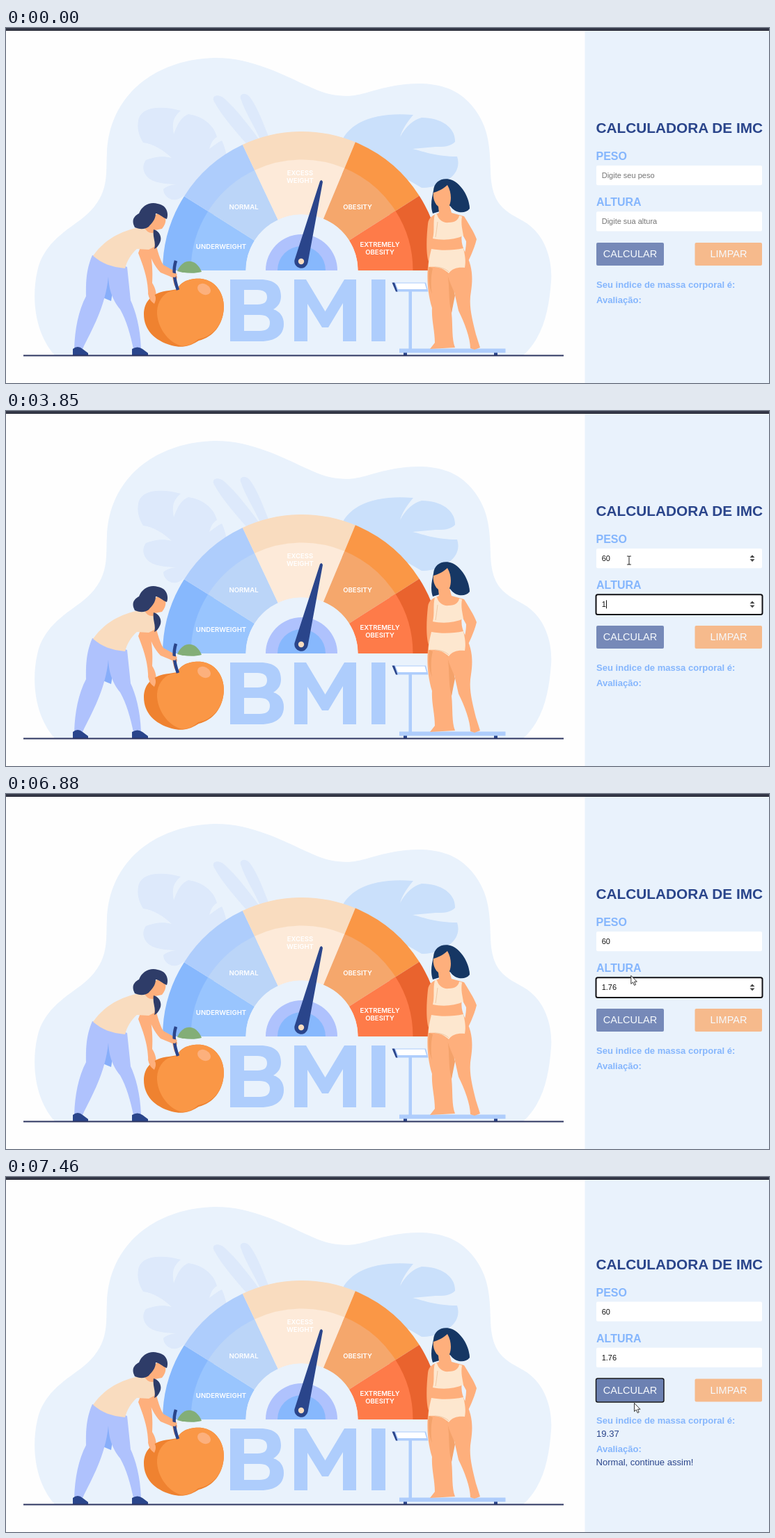
Animation, 1096 px wide and 511 px high, one loop 8000 ms. Source, as an HTML page:

```html
<!DOCTYPE html>
<html lang="pt-BR">
<head>
<meta charset="utf-8">
<title>Calculadora de IMC</title>
<style>
  html, body { margin: 0; width: 100%; height: 100%; overflow: hidden; background: #fefefe; }
  svg { display: block; width: 100vw; height: 100vh; font-family: "Liberation Sans", Arial, sans-serif; }
  .dial { font: 600 9.6px Inter, sans-serif; fill: #fff; text-anchor: middle; }
  .label { font-weight: bold; font-size: 16px; fill: #85b6fd; }
  .result { font-size: 13.05px; fill: #2a458b; }
  .result.head { font-weight: bold; fill: #85b6fd; }
  .value { font-size: 11px; }
  .button { font-size: 14.5px; fill: #fff; text-anchor: middle; }
  .skin { fill: #feaf7c; }
  .navy { fill: #2a458b; }
  .sky { fill: #aecdfc; }
  .panel { fill: #e9f2fc; }
  .focus { fill: none; stroke: #101014; stroke-width: 2; }
</style>
</head>
<body>
<svg viewBox="0 0 1096 511" preserveAspectRatio="none">
  <!-- backdrop -->
  <path class="panel" d="M70 471C42 440 36 390 45 350C54 308 90 290 112 272C150 240 143 210 145 180C148 100 210 46 298 43C352 42 397 67 437 85C475 103 500 99 525 91C575 76 632 72 664 106C694 137 695 170 696 205C697 260 722 265 748 281C778 302 785 340 783 365C780 405 772 445 743 471Z"/>
  <g fill="#dde9fb">
    <path d="M190 134C193 112 225 112 251 119C238 130 239 140 241 153C246 138 252 128 262 124C283 127 299 140 303 157C297 160 294 167 292 174C299 169 305 164 310 162C317 177 319 190 314 205L250 245C238 252 226 242 226 232C232 226 245 224 254 225C238 225 218 225 206 217C196 209 195 198 201 190C214 185 226 184 238 187C226 176 213 167 197 165C191 155 188 145 190 134Z"/>
    <path d="M299 106C294 96 306 95 313 101C333 119 350 142 367 165L350 172C331 150 311 128 299 106Z"/>
    <path d="M338 104C333 95 343 91 350 99C361 114 368 133 377 156L366 162C356 140 344 122 338 104Z"/>
  </g>
  <path fill="#cae0fb" d="M484 159C500 131 538 121 585 125C576 136 569 146 566 157C574 142 585 132 597 129C626 129 646 144 645 164C638 171 628 171 617 171L584 174C601 178 617 185 648 185C652 197 648 209 637 217C626 225 610 231 597 230L520 185Z"/>

  <g id="dial"></g>
  <path fill="#afc2fd" d="M373 349a51.5 52 0 0 1 103 0Z"/>
  <path fill="#87b8fd" d="M390 349a34.5 35 0 0 1 69 0Z"/>
  <path class="navy" d="M414.5 334L451 220.5Q453.5 217 455 221.5L433.5 338A9.7 9.7 0 1 1 414.5 334Z"/>
  <circle cx="424" cy="336" r="4.2" fill="#f9dcbf"/>
  <g class="dial">
    <text x="309" y="317.5">UNDERWEIGHT</text>
    <text x="341.5" y="260.5">NORMAL</text>
    <text x="422.5" y="211.5">EXCESS</text>
    <text x="422.5" y="222.5">WEIGHT</text>
    <text x="505" y="260.5">OBESITY</text>
    <text x="537" y="314.5">EXTREMELY</text>
    <text x="537" y="326">OBESITY</text>
  </g>
  <path class="sky" fill-rule="evenodd" d="M322 362H365C386 362 395 371 395 386C395 395 391 401 384 405C394 408 399 416 399 426C399 442 387 451 366 451H322ZM342 377V398H361Q375 398 375 387.5Q375 377 361 377ZM342 413V436H364Q379 436 379 424.5Q379 413 364 413ZM414 451V362H431L458.5 408L486 362H503V451H484V396L463 431H454L433 397V451ZM525 362H545V451H525Z"/>

  <!-- scale -->
  <rect class="navy" x="571" y="467" width="5" height="4"/>
  <rect class="navy" x="701" y="467" width="5" height="4"/>
  <path class="sky" d="M565 461.5H578.5V379H583V461.5H717.5V467.5H565ZM556 366.5H603L606.5 379.5H562Z"/>
  <path class="navy" d="M554.5 366.5H558L562.5 379.5H560Z"/>
  <path fill="#fff" d="M559.5 367.5H601.5L604 376H563Z"/>

  <!-- standing woman -->
  <path fill="#163764" d="M614 234C615 220 628 214 641 219C656 226 666 246 666 260C659 269 644 266 638 256L626 263L613 267C609 255 612 244 614 234Z"/>
  <path class="skin" d="M614 237C621 235 629 231 634 226C640 236 640 248 637 255L640 266L658 271C664 281 672 293 676 304C672 320 665 334 657 349L653 342C659 328 661 316 661 307L655 296C653 307 656 315 659 322C670 341 671 359 668 379C664 400 670 420 675 441L681 460L673 463L667 461C667 447 659 425 650 407L644 380L640 410C642 430 640 447 645 460L609 462L616 453C616 436 611 420 612 403C605 380 604 356 607 336C603 325 604 300 606 282C607 272 614 269 622 266L621 257C615 252 613 243 614 237Z"/>
  <path fill="#f4a26a" d="M632 345C635 365 643 375 645 385L640 410C634 389 639 369 632 345ZM613 346C610 358 610 372 612 383C607 370 606 357 608 344Z"/>
  <path fill="#fde7cf" d="M616 268L619 268C621 276 628 281 636 280C645 280 650 276 651 270L655 271C653 283 656 291 657 299C644 305 627 306 613 303C616 292 613 280 616 268ZM611 318C627 321 643 320 657 317C659 326 661 335 659 345C649 344 641 346 636 353C627 345 619 343 607 344C607 334 609 327 611 318Z"/>
  <path fill="none" stroke="#f1c9a4" d="M620 279C619 287 618 295 617 301M636 351C631 346 623 344 616 344"/>

  <!-- bending woman -->
  <path fill="#87aefa" d="M140 350L156 362L151 393L139 388Z"/>
  <path fill="#afc2fd" d="M124 327C114 350 115 371 115 386C104 407 99 433 98 462H110C123 435 143 401 147 358C148 383 157 396 164 405C173 421 179 442 183 462H194C193 431 186 407 179 392L174 344Z"/>
  <path class="navy" d="M96 471V462Q103 456 110 462L118 468V471ZM181 471V462Q189 457 196 462L204 468V471Z"/>
  <path class="skin" d="M194 313L206 318C210 334 211 351 210 367C215 375 218 385 214 396C208 394 204 386 204 378C203 357 196 340 190 324ZM207 307L214 306C218 323 222 335 226 341L244 351L246 359L242 372L239 359L222 352C212 342 207 328 203 317Z"/>
  <path fill="#f9dcbf" d="M125 328C145 300 170 291 199 285C213 286 218 300 213 315L205 319L188 318C179 326 174 335 171 346C151 344 138 339 125 328Z"/>
  <path class="skin" d="M204 276L222 264C231 269 232 280 224 289L214 291L211 295Q203 296 198 286Z"/>
  <path fill="#2e3c68" d="M185 287C179 276 185 270 191 267C196 254 208 250 218 253C231 255 234 267 231 275C224 272 218 266 215 267C215 276 209 281 205 286C198 291 190 289 185 287ZM212 290C220 292 225 301 221 309Q218 316 213 318C216 309 210 300 212 290Z"/>

  <!-- apple -->
  <path fill="#ef8230" d="M198 412C198 393 211 380 234 378L246 376C251 364 266 360 281 361C302 364 313 382 313 402C312 428 297 445 277 450C265 458 253 461 238 457C213 450 198 434 198 412Z"/>
  <path fill="#fa9746" d="M245 377C252 364 266 360 281 361C302 364 313 382 313 402C312 427 297 444 276 448C266 457 256 460 247 456C228 448 216 425 217 407C218 394 225 383 236 379Z"/>
  <ellipse cx="284.5" cy="376" rx="10" ry="7.5" fill="#fcb07d" transform="rotate(28 284.5 376)"/>
  <path fill="#83ae77" d="M246 350C254 331 273 331 281 351C270 354 257 353 246 350Z"/>
  <path fill="none" stroke="#2a458b" stroke-width="4.5" d="M244 335C240 347 241 361 247 377"/>
  <path class="skin" d="M204 381L209 381C215 383 217 389 213 397Q205 392 204 381ZM238 352L246 354L243 359L236 358Z"/>
  <path stroke="#2d3560" stroke-width="2" d="M25 471.5H801"/>

  <!-- form -->
  <rect class="panel" x="831.5" width="264.5" height="511"/>
  <rect width="1096" height="4" fill="#353949"/>
  <rect y="3" width="1096" height="1" fill="#1d1f2b"/>
  <g id="form">
    <text x="847.5" y="151" font-weight="bold" font-size="20.8" fill="#2a458b">CALCULADORA DE IMC</text>
    <text class="label" x="847.5" y="190">PESO</text>
    <text class="label" x="848" y="256.3">ALTURA</text>
    <g id="fields"></g>
    <g id="calc">
      <rect class="navy" x="848" y="309" width="97" height="33" rx="2"/>
      <text class="button" x="896.5" y="330">CALCULAR</text>
    </g>
    <rect id="calcFocus" class="focus" x="847.5" y="308.5" width="97.5" height="34" rx="2.5" style="stroke-width:1.4"/>
    <g opacity=".6">
      <rect x="989.5" y="309" width="96.5" height="33" rx="2" fill="#ff9643"/>
      <text class="button" x="1038" y="330">LIMPAR</text>
    </g>
    <text class="result head" x="848" y="373.5">Seu indice de massa corporal é:</text>
  </g>
  <text class="result head" x="848" y="396">Avaliação:</text>
  <g id="answer">
    <text class="result" x="848" y="373.5">19.37</text>
    <text class="result" x="847.5" y="414.5">Normal, continue assim!</text>
  </g>
  <circle id="halo" r="9.7" fill="#fbf614" fill-opacity=".62"/>
  <g id="cursor">
    <path id="arrow" d="M.5 .5V12.5L3.2 10L5.2 14.5L7.2 13.6L5.3 9.3H9Z" fill="#fff" stroke="#222" stroke-width=".9"/>
    <path id="beam" d="M-3 -6H-.8L0 -5.3L.8 -6H3M-3 6H-.8L0 5.3L.8 6H3M0 -5.3V5.3" fill="none" stroke="#333" stroke-width="1.1"/>
  </g>
</svg>
<script>
const LOOP = 8000;
const $ = id => document.getElementById(id);
const show = (el, on) => el.setAttribute('visibility', on ? 'visible' : 'hidden');
const ease = u => u * u * (3 - 2 * u);

// Dial: two rings of five sectors
function sector(from, to, inner, outer, fill) {
  const point = (r, deg) => {
    const a = deg * Math.PI / 180;
    return `${425 + r * Math.cos(a)} ${349 - r * Math.sin(a)}`;
  };
  return `<path fill="${fill}" d="M${point(outer, from)}A${outer} ${outer} 0 0 1 ${point(outer, to)}` +
    `L${point(inner, to)}A${inner} ${inner} 0 0 0 ${point(inner, from)}Z"/>`;
}
const angles = [180, 147.7, 115.2, 67.4, 32.5, 0];
const ring = (inner, outer, colors) =>
  colors.map((c, i) => sector(angles[i], angles[i + 1], inner, outer, c)).join('');
$('dial').innerHTML =
  ring(150, 200, ['#87b8fd', '#aecdfc', '#f9dcbf', '#fa9746', '#e9632e']) +
  ring(80.5, 159.5, ['#99c5fe', '#bbd5f8', '#fdead9', '#f5a76c', '#fe7b49']) +
  '<path class="panel" d="M344.5 349a80.5 80.5 0 0 1 161 0Z"/>';

// Number fields
const fields = [['Digite seu peso', 198], ['Digite sua altura', 264.3]].map(([hint, y]) => {
  const g = document.createElementNS('http://www.w3.org/2000/svg', 'g');
  g.setAttribute('transform', `translate(848 ${y})`);
  g.innerHTML = `<rect width="238" height="28.3" rx="2" fill="#fff"/>
    <rect class="focus" x="-.5" width="239" height="28.7" rx="2.5"/>
    <text class="value" x="7.7" y="18"></text>
    <rect y="8" width="1" height="12" fill="#111"/>
    <path fill="#444" d="M220.5 13L224 9.3L227.5 13ZM220.5 15.2H227.5L224 18.9Z"/>`;
  $('fields').append(g);
  const [, focus, text, caret, spinner] = g.children;
  return { hint, focus, text, caret, spinner };
});

function drawField(field, value, focused, caretOn, hover) {
  field.text.textContent = value || field.hint;
  field.text.setAttribute('fill', value ? '#111' : '#757575');
  const width = [...value].reduce((w, ch) => w + (ch === '.' ? .278 : .556) * 11, 0);
  field.caret.setAttribute('x', Math.round(7.7 + width));
  show(field.focus, focused);
  show(field.caret, focused && caretOn);
  show(field.spinner, focused || hover);
}

// Last value whose start time has passed
const at = (t, steps) => steps.reduce((now, [start, value]) => t >= start ? value : now, steps[0][1]);

function pointer(t) {
  if (t >= 6470) {
    const step = Math.min(9, Math.floor((t - 6470) / 85.5));
    const u = ease(step / 9);
    return [894 + 8 * u, 215 + 110 * u];
  }
  return at(t, [[0, [1001, 394]], [370, [985, 345]], [450, [935, 250]], [530, [912, 214.5]],
    [840, [909, 219]], [925, [900, 221]], [1010, [895, 215]]]);
}

function draw(t) {
  const [x, y] = pointer(t);
  const solved = t >= 7310;
  const over = top => !solved && x < 1086 && y > top && y < top + 28;
  const focus = at(t, [[0, ''], [1300, 'weight'], [3620, 'height'], [7240, 'calc']]);
  const caretOn = at(t, [[0, false], [1300, true], [1860, false], [2390, true], [3000, false],
    [3560, true], [4400, false], [4930, true], [6470, false]]);

  drawField(fields[0], at(t, [[0, ''], [2390, '6'], [2450, '60']]), focus === 'weight', caretOn, over(198));
  drawField(fields[1], at(t, [[0, ''], [3850, '1'], [5240, '1.'], [5410, '1.7'], [5940, '1.76']]),
    focus === 'height', caretOn, over(264));

  $('calc').setAttribute('opacity', at(t, [[0, .6], [6983, .7], [7069, .85], [7154, 1], [7385, .85], [7460, .65]]));
  show($('calcFocus'), focus === 'calc');
  $('form').setAttribute('transform', `translate(0 ${solved ? -18.5 : 0})`);
  show($('answer'), solved);

  const beam = over(198) || over(264);
  $('cursor').setAttribute('transform', `translate(${x} ${y})`);
  show($('beam'), t >= 70 && beam);
  show($('arrow'), t >= 70 && !beam);
  $('halo').setAttribute('cx', x - .7);
  $('halo').setAttribute('cy', y - .8);
  show($('halo'), t >= 1300 && t < 1530 || t >= 7240 && t < 7385);
}

const start = performance.now();
function tick() {
  draw((performance.now() - start) % LOOP);
  requestAnimationFrame(tick);
}
tick();
</script>
</body>
</html>
```
